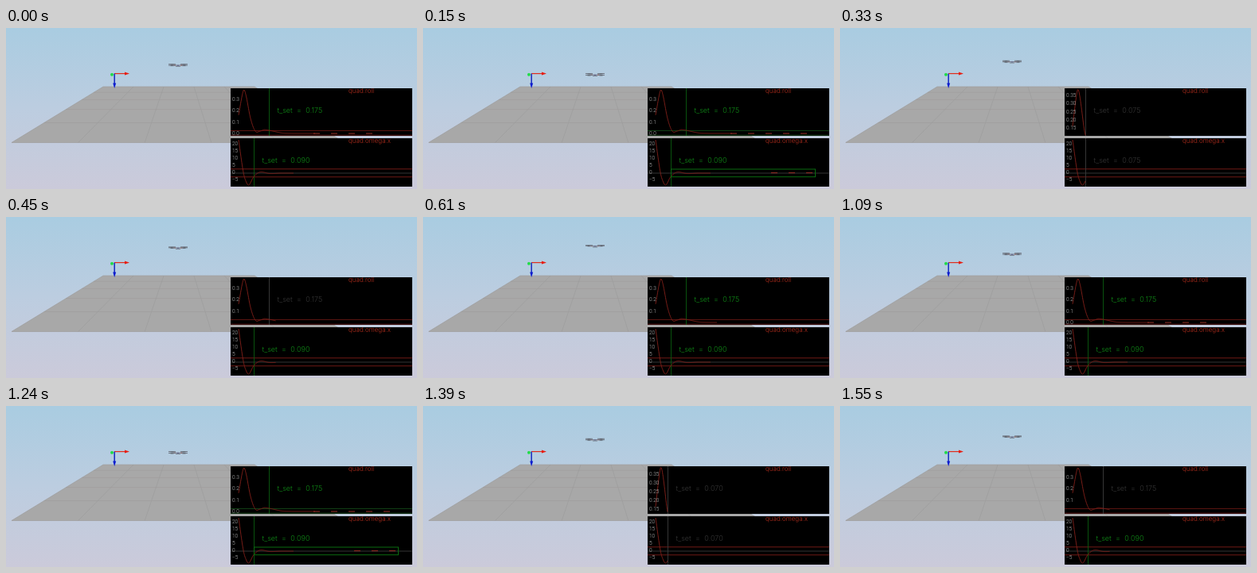
Animation, 516 px wide and 203 px high, one loop 2000 ms. Source, as an HTML page with a canvas:

```html
<!DOCTYPE html>
<html>
<head>
<meta charset="utf-8">
<style>
  html, body { margin: 0; width: 516px; height: 203px; overflow: hidden; }
  canvas { display: block; }
</style>
</head>
<body>
<canvas id="stage" width="516" height="203"></canvas>
<script>
const ctx = document.getElementById('stage').getContext('2d');
const GREEN = '#0f8a16', BOX = '#0b6c10', DIM = '#343434', RED = '#84211a', BOUND = '#5c1612', TITLE = '#b02c1c';
const LEFT = 282, RIGHT = 510, WIDTH = RIGHT - LEFT;
const changes = [0, 150, 330, 450, 610, 760, 910, 1090, 1240, 1390, 1550];

// Each simulated flight has seven steps; the loop opens on step 5
function state(i) {
  const n = (i + 5) % 7, fresh = n === 0;
  const t = i > 8 ? 0.07 : 0.075;
  return {
    fresh,
    y: 42 - 4.1 * n + 0.27 * n ** 2 + 0.145 * n ** 3,
    spread: 0.2 + 0.5 * Math.abs(n - 2.5),
    end: fresh ? timeX(t) : 308 + 30.5 * n,
    scale: fresh ? 15.4 / t : 141,
    rollTime: fresh ? t : 0.175,
    omegaTime: fresh ? t : 0.09,
    omegaSet: n > 0, rollSet: n > 1, zero: n > 3, box: n > 5
  };
}

function timeX(t) {
  return Math.round(291.5 + 220 * t);
}

// Smooth curve through a few points
function spline(p) {
  const slope = i => {
    const a = p[Math.max(i - 1, 0)], b = p[Math.min(i + 1, p.length - 1)];
    return (b[1] - a[1]) / (b[0] - a[0]);
  };
  return x => {
    let i = 0;
    while (i < p.length - 2 && x > p[i + 1][0]) i++;
    const [x0, y0] = p[i], [x1, y1] = p[i + 1], w = x1 - x0;
    const u = Math.min((x - x0) / w, 1), v = 1 - u;
    return v * v * (1 + 2 * u) * y0 + u * v * v * w * slope(i)
      + u * u * (3 - 2 * u) * y1 - u * u * v * w * slope(i + 1);
  };
}
const roll = spline([[292, .16], [298, .378], [301, .345], [307, .13], [313, .015],
  [319, .016], [325, .029], [346, 0], [360, -.004]]);
const omega = spline([[292, 141], [298, 182], [302, 195], [305, 198], [311, 187.5],
  [319, 181.7], [331, 183.5], [345, 183]]);

function line(color, width, ...pts) {
  ctx.strokeStyle = color;
  ctx.lineWidth = width;
  ctx.beginPath();
  for (const [x, y] of pts) ctx.lineTo(x, y);
  ctx.stroke();
}

function across(color, y, from = LEFT, to = RIGHT) {
  line(color, 1, [from, y], [to, y]);
}

function text(s, x, y, color, font) {
  ctx.fillStyle = color;
  ctx.font = font;
  ctx.fillText(s, x, y);
}

function poly(color, ...pts) {
  ctx.fillStyle = color;
  ctx.beginPath();
  for (const [x, y] of pts) ctx.lineTo(x, y);
  ctx.fill();
}

function scene() {
  const sky = ctx.createLinearGradient(0, 0, 0, 203);
  sky.addColorStop(0, '#a9cce1');
  sky.addColorStop(0.5, '#bccde0');
  sky.addColorStop(1, '#cbcada');
  ctx.fillStyle = sky;
  ctx.fillRect(0, 0, 516, 203);

  poly('#a8a8a8', [122, 74], [312, 74], [425, 144.5], [7, 144.5]);
  for (let i = 0; i <= 5; i++) {
    line('#9c9c9c', 0.7, [122 + 38 * i, 74], [7 + 83.6 * i, 144.5]);
    // Row width is inverse to its distance from the camera
    const w = 1 / (1 / 190 + (1 / 418 - 1 / 190) * i / 5), k = (w - 190) / 228;
    line('#9f9c9c', 0.7, [122 - 115 * k, 74 + 70.5 * k], [122 - 115 * k + w, 74 + 70.5 * k]);
  }

  line('#e02a18', 1.2, [136, 57.5], [150, 57.5]);
  poly('#e81c10', [149, 55.4], [155, 57.5], [149, 59.6]);
  line('#1428c0', 1.5, [136.2, 57.5], [136.2, 71]);
  poly('#0c1cd0', [134.2, 69.5], [138.2, 69.5], [136.2, 76]);
  ctx.fillStyle = '#20dc48';
  ctx.beginPath();
  ctx.arc(133, 58.8, 2, 0, 7);
  ctx.fill();
}

function drone({ y, spread }) {
  for (const side of [-1, 1]) {
    const r = y + side * spread / 2;
    for (const x of [208.5, 223.5]) {
      line('#666a74', 0.9, [x - 4.5, r], [x + 4.5, r]);
      line('#50545c', 0.8, [x - 2, r + .5], [x + 2, r + .5]);
    }
    const x = 216 + side * 4;
    line('#b06050', 0.9, [x - 1, y + .7], [x + 1, y + .7]);
  }
  line('#7c7c88', 0.9, [209, y + .5], [223, y + .5]);
  line('#5a6090', 0.9, [214.5, y + 1], [217.5, y + 1]);
  line('#686c74', 0.8, [213, y + 2], [219, y + 2]);
}

function plot(top, height, title, ticks, draw) {
  ctx.save();
  ctx.beginPath();
  ctx.rect(LEFT, top, WIDTH, height);
  ctx.clip();
  ctx.fillStyle = '#000';
  ctx.fillRect(LEFT, top, WIDTH, height);
  draw();
  for (const [s, y] of ticks) text(s, 284, y + 2.4, '#bcbcbc', '300 6.5px Roboto, sans-serif');
  text(title, 430, top + 6.3, TITLE, '300 8px Inter, sans-serif');
  ctx.restore();
}

function settle(t, top, bottom, isSet) {
  const x = timeX(t);
  line(isSet ? '#0a5c10' : '#3c3c3c', 0.9, [x + .5, top], [x + .5, bottom]);
  ctx.wordSpacing = '2.8px';
  text('t_set = ' + t.toFixed(3), x + 10.5, top + 31, isSet ? GREEN : DIM, '300 9px Inter, sans-serif');
  ctx.wordSpacing = '0px';
}

function trace(fn, end) {
  const pts = [];
  for (let x = 292; x <= end; x += .5) pts.push([x, fn(x)]);
  line(RED, 0.9, ...pts);
}

// Leftover specks where the settled signal wavers
function specks(y, from, end) {
  for (let x = from; x < end - 6; x += 22) across('#983026', y, x, x + 8);
}

function render(s) {
  scene();
  drone(s);

  const rollY = v => 79 + (.378 - v) * s.scale;
  const rollTicks = [];
  const [low, gap, digits] = s.fresh ? [.15, .05, 2] : [s.zero ? 0 : .1, .1, 1];
  for (let v = low; v < .36; v += gap) rollTicks.push([v.toFixed(digits), rollY(v)]);
  plot(76, 60, 'quad.roll', rollTicks, () => {
    for (const v of [.02, -.02]) across(s.box ? '#124016' : BOUND, rollY(v));
    settle(s.rollTime, 76, 136, s.rollSet);
    trace(x => rollY(roll(x)), Math.min(s.end, 388));
    specks(133, 386, s.end);
  });

  const omegaTicks = [];
  for (let v = 20; v >= -5; v -= 5) omegaTicks.push([String(v).replace('-', '−'), 181.5 - 1.82 * v]);
  plot(139, 61, 'quad.omega.x', omegaTicks, () => {
    across('#343434', 183);
    if (!s.box) for (const y of [177.8, 187.8]) across('#701a16', y);
    settle(s.omegaTime, 139, 200, s.omegaSet);
    trace(omega, Math.min(s.end, 361));
    if (s.box) {
      ctx.strokeStyle = BOX;
      ctx.lineWidth = 1;
      ctx.strokeRect(311.5, 178, 181, 9.7);
      specks(182.6, 437, s.end);
    }
  });
}

function tick(now) {
  const t = now % 2000;
  render(state(changes.filter(at => at <= t).length - 1));
  requestAnimationFrame(tick);
}
tick(0);
</script>
</body>
</html>
```
